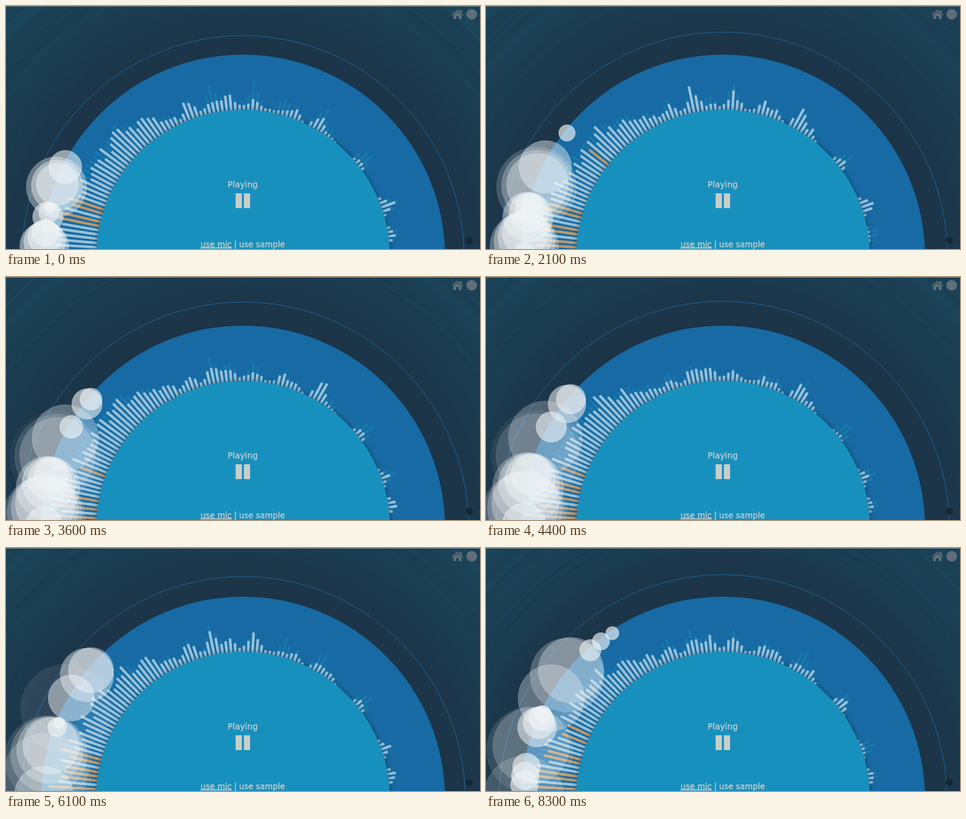
Animation of 800 by 410 pixels, one loop 8400 ms. Source, as an HTML page with a canvas:

```html
<!DOCTYPE html>
<html lang="en">
<head>
<meta charset="utf-8">
<title>Audio visualizer</title>
<style>
  html, body { margin: 0; width: 100%; height: 100%; overflow: hidden; background: #1c374a; }
  canvas, svg { position: absolute; left: 0; top: 0; display: block; }
  text { font: 13.5px "DejaVu Sans", sans-serif; fill: #c8d0cf; stroke: #c8d0cf; stroke-width: .3px; }
  .link { text-decoration: underline; }
  .icon { fill: #5f6e79; }
</style>
</head>
<body>
<canvas id="stage" width="800" height="410"></canvas>
<svg width="800" height="410" viewBox="0 0 800 410">
  <text x="399.5" y="306" text-anchor="middle" style="font-size:14px">Playing</text>
  <g fill="#c9cec7">
    <rect x="387.5" y="316" width="10.5" height="25" rx="1"/>
    <rect x="401.5" y="316" width="10.5" height="25" rx="1"/>
  </g>
  <text class="link" x="328.5" y="406.5">use mic</text>
  <text x="385" y="406.5">|</text>
  <text x="393.5" y="406.5">use sample</text>
  <g class="icon">
    <path d="M752 14.5 762 6l4 3.4V7h3v5l3 2.5-1.2 1.3L762 8.4l-8.8 7.4z"/>
    <path d="M755 15.6 762 9.8l7 5.8V22h-5v-5h-4v5h-5z"/>
    <circle cx="786" cy="14" r="9"/>
  </g>
  <circle cx="782" cy="395.5" r="6" fill="#172732"/>
  <rect width="800" height="1" fill="#7f8b8b"/>
</svg>
<script>
const LOOP = 8400, STEP = 100;
const CX = 400, CY = 423, INNER = 248, OUTER = 341;
const BARS = 108, PITCH = 180 / BARS;
const ctx = document.getElementById('stage').getContext('2d');

// Steps that repeat the picture before them.
const held = [31, 34, 37, 40, 42, 45, 48, 51, 55, 57, 60, 62, 64, 68, 74, 76, 78, 81, 82];

const clamp = (v, a, b) => Math.min(b, Math.max(a, v));
const mix = (a, b, u) => a + (b - a) * u;
const rad = deg => deg * Math.PI / 180;
const rand = (a, b = 0) => {
  const v = Math.sin(a * 127.1 + b * 311.7 + 17.3) * 43758.5453;
  return v - Math.floor(v);
};

// Smooth seeded noise over x, from 0 to 1.
function noise(x, seed) {
  const k = Math.floor(x), u = x - k;
  return mix(rand(k, seed), rand(k + 1, seed), u * u * (3 - 2 * u));
}

// Reads a flat list of x, y pairs as a broken line.
function curve(pts, x) {
  if (x <= pts[0]) return pts[1];
  for (let k = 2; k < pts.length; k += 2) {
    if (x <= pts[k]) return mix(pts[k - 1], pts[k + 1], (x - pts[k - 2]) / (pts[k] - pts[k - 2]));
  }
  return pts[pts.length - 1];
}

// Spectrum by angle in degrees: a falling bass floor plus pulsing bands [angle, gain].
const bass = [0, 85, 20, 55, 44, 46, 58, 22, 66, 7, 100, 5, 104, 0];
const bands = [[45.5, 18], [54, 17], [62, 14], [69.5, 34], [78.5, 42], [84.5, 28], [93.5, 46],
  [105, 32], [110, 22], [119.5, 44], [125, 18], [141, 34], [160, 30], [171, 22]];
const BAND_WIDTH = 4.2;

function level(i, t) {
  const angle = i * PITCH;
  let h = curve(bass, angle);
  bands.forEach(([at, gain], k) => {
    const near = 1 - Math.abs(angle - at) / BAND_WIDTH;
    if (near > 0) h += gain * near * (.1 + .9 * noise(t / 420, k));
  });
  return Math.min(95, h * (.75 + .42 * rand(i, t / STEP)));
}

// Ripples start on the rim; later ones of a burst move on by a gap and an angle.
const ripples = [];
function burst(angle, born, count = 1, gap = 0, turn = 0) {
  for (let k = 0; k < count; k++) ripples.push({ angle: angle + k * turn, born: born + k * gap });
}
burst(20.5, -6540, 3, 970, .4);
burst(3, -5300, 4, 800, 1.3);
burst(26.8, -3590);
burst(11.5, -3300, 4, 1100, 1.3);
burst(.8, -350);
burst(38.4, 300);
burst(30.4, 1100);
burst(40.2, 1200);
burst(21, 4050, 4, 800, 1.4);
burst(4, 5300, 3, 0, 2.6);
burst(48.2, 5970, 3, 440, 4);

const rippleSize = (ripple, t) => (t - ripple.born) * .0078;

const ringSize = [0, 373, 1200, 378, 3000, 380, 4400, 382, 6100, 375, 7100, 372, 8300, 378];

function disc(x, y, r, fill) {
  ctx.beginPath();
  ctx.arc(x, y, r, 0, 7);
  ctx.fillStyle = fill;
  ctx.fill();
}

function ring(r, width, colour) {
  ctx.beginPath();
  ctx.arc(CX, CY, r, Math.PI, 2 * Math.PI);
  ctx.lineWidth = width;
  ctx.strokeStyle = colour;
  ctx.stroke();
}

function bar(i, h, colour) {
  if (h < .8) return;
  ctx.save();
  ctx.translate(CX, CY);
  ctx.rotate(rad(i * PITCH));
  ctx.fillStyle = colour;
  ctx.fillRect(-INNER - h, -3.8, h + 2, 4.4);
  ctx.restore();
}

const backdrop = ctx.createRadialGradient(CX, CY, OUTER, CX, CY, 600);
backdrop.addColorStop(0, '#1c3447');
backdrop.addColorStop(.17, '#1c364a');
backdrop.addColorStop(.4, '#1c3c50');
backdrop.addColorStop(1, '#1b4358');

function drawBackdrop(t) {
  ctx.fillStyle = backdrop;
  ctx.fillRect(0, 0, 800, 410);
  for (let k = 0; k < 46; k++) {
    const r = 390 + (k * 4.6 + t * .012) % 212;
    const strength = clamp((r - 388) / 150, 0, 1) * (.02 + .08 * rand(k, 5));
    ring(r, 1 + 5 * rand(k, 2), `rgba(${rand(k, 3) > .4 ? '28,112,142' : '24,45,62'},${strength})`);
  }
}

// Recent maximum of each bar, shown faintly behind it.
function drawPeaks(t) {
  for (let i = 2; i < BARS; i++) {
    let top = 0;
    for (let back = 0; back <= 16; back++) top = Math.max(top, level(i, t - back * STEP));
    bar(i, top, 'rgba(24,150,194,.34)');
  }
}

// Bars glow in the bass at random, and where a ripple has just started.
function isHot(i, h, t) {
  const angle = i * PITCH;
  if (angle < 25) return rand(i, Math.floor(t / 600) + 40) > .2 + angle / 36;
  return h > 34 && ripples.some(p => {
    const r = rippleSize(p, t);
    return r > 8 && r < 16 && p.angle < 45 && Math.abs(p.angle - angle) < PITCH / 2;
  });
}

function drawBars(t) {
  for (let i = 2; i < BARS; i++) {
    const h = level(i, t);
    bar(i, h, isHot(i, h, t) ? 'rgba(250,162,82,.73)' : 'rgba(236,242,246,.6)');
  }
}

function drawRipples(t) {
  for (const p of ripples) {
    const r = rippleSize(p, t);
    const a = .7 * (1 - (r / 82) ** 1.6);
    if (r < 8 || a <= 0) continue;
    const x = CX - 336 * Math.cos(rad(p.angle)), y = CY - 336 * Math.sin(rad(p.angle));
    disc(x, y, r, `rgba(240,243,245,${a})`);
    ctx.lineWidth = 1;
    ctx.strokeStyle = `rgba(255,255,255,${a * .5})`;
    ctx.stroke();
  }
}

function draw(now) {
  let step = Math.floor(now % LOOP / STEP);
  while (held.includes(step)) step--;
  const t = step * STEP;
  drawBackdrop(t);
  ring(curve(ringSize, t), 1, '#1c689c');
  disc(CX, CY, OUTER, '#176aa3');
  drawPeaks(t);
  drawBars(t);
  drawRipples(t);
  ctx.shadowColor = 'rgba(0,0,0,.4)';
  ctx.shadowBlur = 8;
  disc(CX, CY, INNER, '#1890be');
  ctx.shadowBlur = 0;
}

const start = performance.now();
(function frame() {
  draw(performance.now() - start);
  requestAnimationFrame(frame);
})();
</script>
</body>
</html>
```
